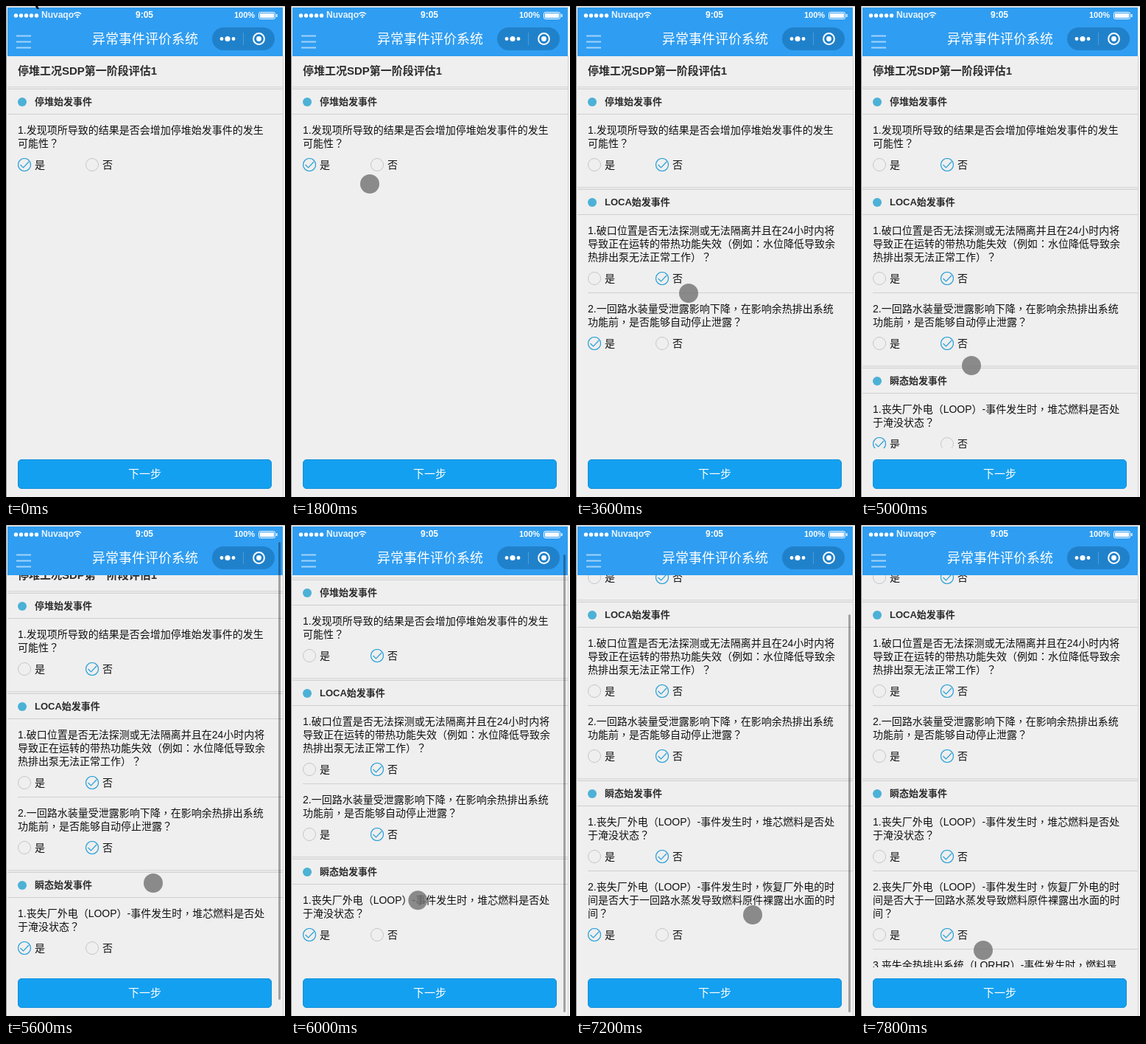
Write an HTML page that moves like this. It is 379 px wide and 665 px high and loops after 8 s.

```html
<!DOCTYPE html>
<html lang="zh-TW">
<head>
<meta charset="utf-8">
<style>
html, body { margin: 0; width: 100%; height: 100%; overflow: hidden; background: #efefef; }
body { position: relative; font: 14px/18px "Liberation Sans", "Noto Sans CJK TC", "Noto Sans CJK", sans-serif; color: #111; white-space: nowrap; text-spacing-trim: space-all; }
#page { position: absolute; left: 2px; top: 68px; width: 374px; height: 531px; overflow: hidden; }
#doc { padding-left: 14px; }
h1, h2 { margin: 0; color: #2c2c2c; }
h1 { height: 41px; font-size: 15px; line-height: 40px; }
h2 { position: relative; box-sizing: border-box; height: 37px; margin-left: -14px; padding-left: 37px; border-top: 1px solid #d8d8d8; font-size: 13px; line-height: 40px; }
h2::before { content: ""; position: absolute; left: 0; right: 0; top: 0; height: 2px; background: #e8e8e8; border-bottom: 1px solid #d2d2d2; }
h2::after { content: ""; position: absolute; left: 14px; top: 14px; width: 12px; height: 12px; border-radius: 50%; background: #4cb1d6; }
.q { box-sizing: border-box; padding: 12px 0 10px; border-top: 1px solid #cfcfcf; }
.q.first { margin-left: -14px; padding-left: 14px; }
.q.last { margin-bottom: 11px; }
.opts { position: relative; height: 18px; margin-top: 11px; }
.opts span { position: absolute; left: 23px; }
.opts span + span { left: 115px; }
.opts svg { position: absolute; left: -23px; top: 0; width: 18px; height: 18px; fill: none; stroke: #c6c6c6; }
.opts path { display: none; }
.opts .on svg { stroke: #2aa0d8; stroke-width: 1.2; }
.opts .on path { display: inline; }
#chrome { position: absolute; left: 0; top: 0; }
#bar { position: absolute; left: 370px; width: 3px; border-radius: 2px; background: rgba(0,0,0,.32); }
#touch { position: absolute; left: -13px; top: -13px; width: 26px; height: 26px; border-radius: 50%; background: rgba(112,112,112,.8); }
</style>
</head>
<body>
<div id="page"><div id="doc"><h1>停堆工况SDP第一阶段评估1</h1></div></div>
<svg id="chrome" width="379" height="665">
  <path fill="#2f9df1" d="M2 2h374v66H2z"/>
  <path fill="#c4c4c4" d="M0 0h379v1H0z"/>
  <path fill="#999" d="M0 0h1v665H0z"/>
  <path fill="#f7f7f7" d="M376 1h3v664h-3z"/>
  <path fill="#d0d0d0" d="M376 68h1v597h-1z"/>
  <g fill="#fff">
    <path d="M13.5 13h28.3" stroke="#fff" stroke-width="5.4" stroke-linecap="round" stroke-dasharray="0 7"/>
    <text x="48" y="16" font-size="12" font-weight="bold" fill="#e8f4ff">Nuvaqo</text>
    <path d="M92 11q5-4.5 10 0M94 13.3q3-2.6 6 0" fill="none" stroke="#fff" stroke-width="1.5"/>
    <circle cx="97" cy="15" r="1.3"/>
    <text x="188" y="16" font-size="12" font-weight="bold" text-anchor="middle">9:05</text>
    <text x="310" y="16" font-size="11" font-weight="bold">100%</text>
    <rect x="343.5" y="8.5" width="22" height="9" rx="2" fill="none" stroke="#fff"/>
    <path d="M345 10h19v6h-19zM367 11h1.5v4H367z"/>
    <text x="189" y="51" font-size="18" text-anchor="middle">异常事件评价系统</text>
    <path d="M14 40.5h20M14 48.5h20M14 56.5h20" stroke="#a4d4fa" stroke-width="2"/>
    <rect x="280" y="29" width="85" height="31" rx="15.5" fill="#2081cb"/>
    <path d="M322.5 36v17" stroke="#4b9cd8"/>
    <circle cx="293" cy="44.5" r="2.4"/><circle cx="301" cy="44.5" r="3.6"/><circle cx="309" cy="44.5" r="2.4"/>
    <circle cx="343.5" cy="44.5" r="7.4" fill="none" stroke="#fff" stroke-width="2"/>
    <circle cx="343.5" cy="44.5" r="3.4"/>
    <rect x="16.5" y="614.5" width="344" height="39" rx="4.5" fill="#14a0f0" stroke="#1290dc"/>
    <text x="188.5" y="639" font-size="15" text-anchor="middle">下一步</text>
  </g>
  <path id="arrow" d="M34 0h4l1-1 3 5h3l-2-4h3z" fill="#111"/>
</svg>
<div id="bar"></div>
<div id="touch"></div>
<script>
const $ = id => document.getElementById(id);
const LOOP = 8000, STEP = 200;

// show: time the question appears; pick: time the answer flips to 否
const sections = [
  ['停堆始发事件', [
    { show: 0, pick: 2200, text: '1.发现项所导致的结果是否会增加停堆始发事件的发生<br>可能性？' }]],
  ['LOCA始发事件', [
    { show: 2200, pick: 3000, text: '1.破口位置是否无法探测或无法隔离并且在24小时内将<br>导致正在运转的带热功能失效（例如：水位降低导致余<br>热排出泵无法正常工作）？' },
    { show: 3000, pick: 4400, text: '2.一回路水装量受泄露影响下降，在影响余热排出系统<br>功能前，是否能够自动停止泄露？' }]],
  ['瞬态始发事件', [
    { show: 4400, pick: 6600, text: '1.丧失厂外电（LOOP）-事件发生时，堆芯燃料是否处<br>于淹没状态？' },
    { show: 6600, pick: 7600, text: '2.丧失厂外电（LOOP）-事件发生时，恢复厂外电的时<br>间是否大于一回路水蒸发导致燃料原件裸露出水面的时<br>间？' },
    { show: 7600, pick: LOOP, text: '3.丧失余热排出系统（LORHR）-事件发生时，燃料是' }]]
];

// [time, value...] keys
const path = [[1000, 110, 40], [1200, 196, 130], [1400, 170, 200], [1600, 125, 238], [1800, 107, 241],
  [2000, 117, 222], [2200, 118, 228], [2400, 122, 300], [2600, 122, 300], [2800, 117, 366], [3000, 117, 369],
  [3600, 153, 389], [4000, 122, 450], [4400, 117, 457], [5000, 150, 487], [5600, 200, 485],
  [5800, 200, 485], [6400, 117, 555], [6600, 120, 554], [6800, 249, 525], [7200, 240, 528], [7600, 117, 556], [7800, 166, 576]];
const scrollKeys = [[5400, 0], [5600, 20], [5800, 38], [6800, 38], [7000, 74], [7200, 144]];

function at(keys, t) {
  const i = keys.findIndex(k => k[0] > t);
  if (i < 0) return keys.at(-1).slice(1);
  if (!i) return keys[0].slice(1);
  const a = keys[i - 1], b = keys[i], u = (t - a[0]) / (b[0] - a[0]);
  return a.slice(1).map((v, j) => v + (b[j + 1] - v) * u);
}

function add(tag, html, cls = '') {
  const el = document.createElement(tag);
  el.innerHTML = html;
  el.className = cls;
  $('doc').append(el);
  return el;
}

const tick = '<svg><circle cx="9" cy="9" r="8.5"/><path d="M3.5 9l4 4 7.5-8"/></svg>';
const questions = [];
for (const [name, list] of sections) {
  const head = add('h2', name);
  list.forEach((q, i) => {
    q.el = add('div', `${q.text}<div class="opts"><span>${tick}是</span><span>${tick}否</span></div>`, i ? 'q' : 'q first');
    q.head = i ? null : head;
    q.next = list[i + 1];
    q.spans = q.el.querySelectorAll('span');
    questions.push(q);
  });
}

function draw(now) {
  const t = Math.floor(now % LOOP / STEP) * STEP;
  for (const q of questions) {
    const display = t >= q.show ? '' : 'none';
    q.el.style.display = display;
    if (q.head) q.head.style.display = display;
    q.el.classList.toggle('last', !q.next || t < q.next.show);
    q.spans[0].className = t < q.pick ? 'on' : '';
    q.spans[1].className = t < q.pick ? '' : 'on';
  }

  const [scroll] = at(scrollKeys, t);
  $('doc').style.transform = `translateY(${-scroll}px)`;

  const max = t < 6600 ? 38 : 144, size = 656 * 664 / (664 + max);
  const bar = $('bar').style;
  bar.display = (t >= 5600 && t < 6200) || (t >= 7000 && t < 7600) ? '' : 'none';
  bar.top = 4 + (656 - size) * scroll / max + 'px';
  bar.height = size + 'px';

  const [x, y] = at(path, t);
  $('arrow').style.display = t < 1000 ? '' : 'none';
  $('touch').style.display = t < 1000 ? 'none' : '';
  $('touch').style.transform = `translate(${x}px,${y}px)`;
  requestAnimationFrame(draw);
}
requestAnimationFrame(draw);
</script>
</body>
</html>
```
